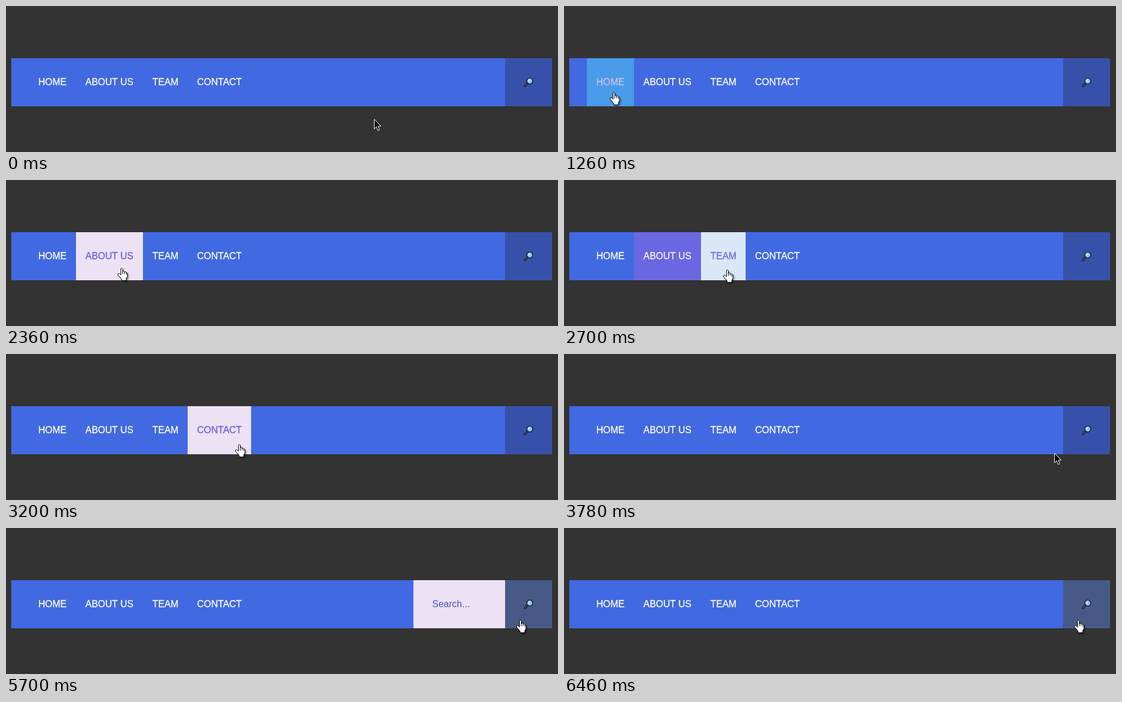
Animation of 939 by 249 pixels, one loop 6.74 s. Source, as an HTML page with a canvas:

```html
<!DOCTYPE html>
<html lang="en">
<head>
<meta charset="utf-8">
<title>Navigation bar</title>
<style>
  html, body { margin: 0; width: 100%; height: 100%; overflow: hidden; background: #333; }
  canvas { display: block; }
</style>
</head>
<body>
<canvas width="939" height="249"></canvas>
<script>
const ctx = document.querySelector('canvas').getContext('2d');
const LOOP = 6740, FADE = 300, HOLD = 150;
const NAV = { x: 9, y: 89, w: 920, h: 82 };
const PAD = 16, SEARCH_WIDTH = 300;
ctx.font = '16px "Liberation Sans", Arial, sans-serif';

// Pointer stops: time, x, y
const stops = [
  [140, 626, 193], [800, 287, 207], [1180, 106, 171], [1260, 84, 148],
  [1540, 74, 125], [1780, 74, 125], [1920, 98, 136], [2020, 143, 147],
  [2440, 210, 152], [2700, 277, 154], [3260, 417, 155], [3780, 834, 169],
  [3980, 874, 158],
];
const clicks = [4100, 4820, 5460, 6120];
const shades = ['#4169e1', '#6a67e2', '#4a9be9', '#d9e8f6', '#ece2f4'];

const arrow = new Path2D('M.5 .5V16.5L4 13L6.5 19H8.5L9 17.5L6.8 12H11.3Z');
const hand = new Path2D('M6.5 .5H7.5L8.5 1.5V5.5H10.5L11.5 6.5H13L14 7.5H15L16.5 9V14.5L14.5 18V21.5H6.5V19L.5 12V10L1.5 9.5H3L5.5 12V1.5Z');
const knuckles = new Path2D('M8.5 5.5V10M11.5 6.5V10M14.5 7.5V11');

// CSS "ease": cubic-bezier(.25, .1, .25, 1)
function ease(x) {
  if (x <= 0) return 0;
  if (x >= 1) return 1;
  let lo = 0, hi = 1, u;
  for (let i = 0; i < 20; i++) {
    u = (lo + hi) / 2;
    if (.75 * u * (1 - u) + u ** 3 < x) lo = u; else hi = u;
  }
  return .3 * u * (1 - u) ** 2 + 3 * u * u * (1 - u) + u ** 3;
}
const fade = (t, since) => ease((t - since) / FADE);
const smooth = p => p * p * (3 - 2 * p);
const mix = (a, b, p) => `rgb(${a.map((v, i) => Math.round(v + (b[i] - v) * p))})`;

// Monotone cubic through the stops: smooth, with no overshoot at rests
function slope(i, axis) {
  const a = stops[i], b = stops[i + 1];
  return a && b ? (b[axis] - a[axis]) / (b[0] - a[0]) : 0;
}
function speed(i, axis) {
  const a = slope(i - 1, axis), b = slope(i, axis);
  return a * b > 0 ? 2 * a * b / (a + b) : 0;
}
function pointer(t) {
  t = Math.max(stops[0][0], Math.min(t, stops.at(-1)[0]));
  const i = Math.max(0, stops.findIndex(s => s[0] >= t) - 1);
  const span = stops[i + 1][0] - stops[i][0], p = (t - stops[i][0]) / span;
  return [1, 2].map(axis => {
    const from = stops[i][axis], to = stops[i + 1][axis];
    return Math.round(from + (to - from) * smooth(p)
      + span * p * (1 - p) * (speed(i, axis) * (1 - p) - speed(i + 1, axis) * p));
  });
}

const isOver = ({ x, w }, [px, py]) =>
  px >= x && px < x + w && py >= NAV.y && py < NAV.y + NAV.h;

// Lay out the links, then walk the pointer once to learn when each is hovered
let right = 39;
const items = ['HOME', 'ABOUT US', 'TEAM', 'CONTACT'].map(label => {
  const x = right, w = Math.round(ctx.measureText(label).width) + 2 * PAD;
  right += w;
  return { label, x, w };
});
const button = { x: 849, w: 80 };
const targets = [...items, button];
for (const target of targets) target.enter = target.leave = LOOP;
for (let t = 0; t < LOOP; t += 2) {
  for (const target of targets) {
    if (!isOver(target, pointer(t))) continue;
    target.enter = Math.min(target.enter, t);
    target.leave = t + 2;
  }
}

function rect(color, x, w, y = NAV.y, h = NAV.h) {
  ctx.fillStyle = color;
  ctx.fillRect(x, y, w, h);
}

function text(color, label, x) {
  ctx.fillStyle = color;
  ctx.fillText(label, x, 135);
}

function disc(color, x, y, r) {
  ctx.fillStyle = color;
  ctx.beginPath();
  ctx.arc(x, y, r, 0, 7);
  ctx.fill();
}

function line(color, width, x0, y0, x1, y1) {
  ctx.strokeStyle = color;
  ctx.lineWidth = width;
  ctx.beginPath();
  ctx.moveTo(x0, y0);
  ctx.lineTo(x1, y1);
  ctx.stroke();
}

function drawItem({ label, x, w, enter, leave }, t) {
  const p = fade(t, enter) - fade(t, leave);
  rect(shades[Math.round(p * (shades.length - 1))], x, w);
  const color = mix([255, 255, 255], [106, 95, 222], smooth(p));
  text(color, label, x + PAD);
  ctx.strokeStyle = color;
  ctx.lineWidth = .3;
  ctx.strokeText(label, x + PAD, 135);
}

// Odd clicks open the field on release, even ones close it on press
function drawSearch(t) {
  const open = clicks.reduce((sum, at, i) =>
    sum + (i % 2 ? -fade(t, at + 20) : fade(t, at + HOLD)), 0);
  if (open <= 0) return;
  const width = SEARCH_WIDTH * open, x = button.x - width;
  ctx.save();
  ctx.beginPath();
  ctx.rect(x, NAV.y, width, NAV.h);
  ctx.clip();
  rect('#ece2f4', x, width);
  text('#4d52bd', 'Search...', x + 2 * PAD);
  ctx.restore();
}

function drawButton(t) {
  rect(mix([55, 81, 171], [71, 90, 135], fade(t, button.enter)), button.x, button.w);
  ctx.lineCap = 'round';
  line('#15151c', 3.6, 882.8, 136.4, 887, 132);
  line('#69656c', 1.3, 882.8, 136.4, 886.5, 132.5);
  disc('#15151c', 891, 128, 5.7);
  disc('#86c5ea', 891, 128, 4.4);
  disc('#b5e0f4', 890, 127, 2.2);
}

function drawCursor(t) {
  const tip = pointer(t), [x, y] = tip;
  const isHand = targets.some(target => isOver(target, tip));
  if (clicks.some(at => t >= at && t < at + HOLD)) disc('rgba(51,51,51,.6)', x - 1, y, 12);
  ctx.save();
  ctx.translate(isHand ? x - 6 : x, isHand ? y - 1 : y);
  ctx.lineWidth = 1;
  ctx.fillStyle = isHand ? '#fff' : '#000';
  ctx.strokeStyle = isHand ? '#000' : '#fff';
  if (isHand) {
    ctx.shadowColor = 'rgba(0,0,0,.5)';
    ctx.shadowBlur = 3;
    ctx.shadowOffsetX = ctx.shadowOffsetY = 2;
  }
  const shape = isHand ? hand : arrow;
  ctx.fill(shape);
  ctx.shadowColor = 'transparent';
  ctx.stroke(shape);
  if (isHand) ctx.stroke(knuckles);
  ctx.restore();
}

function draw(t) {
  rect('#333', 0, 939, 0, 249);
  rect(shades[0], NAV.x, NAV.w);
  for (const item of items) drawItem(item, t);
  drawSearch(t);
  drawButton(t);
  drawCursor(t);
}

const start = performance.now();
function tick() {
  draw((performance.now() - start) % LOOP);
  requestAnimationFrame(tick);
}
tick();
</script>
</body>
</html>
```
